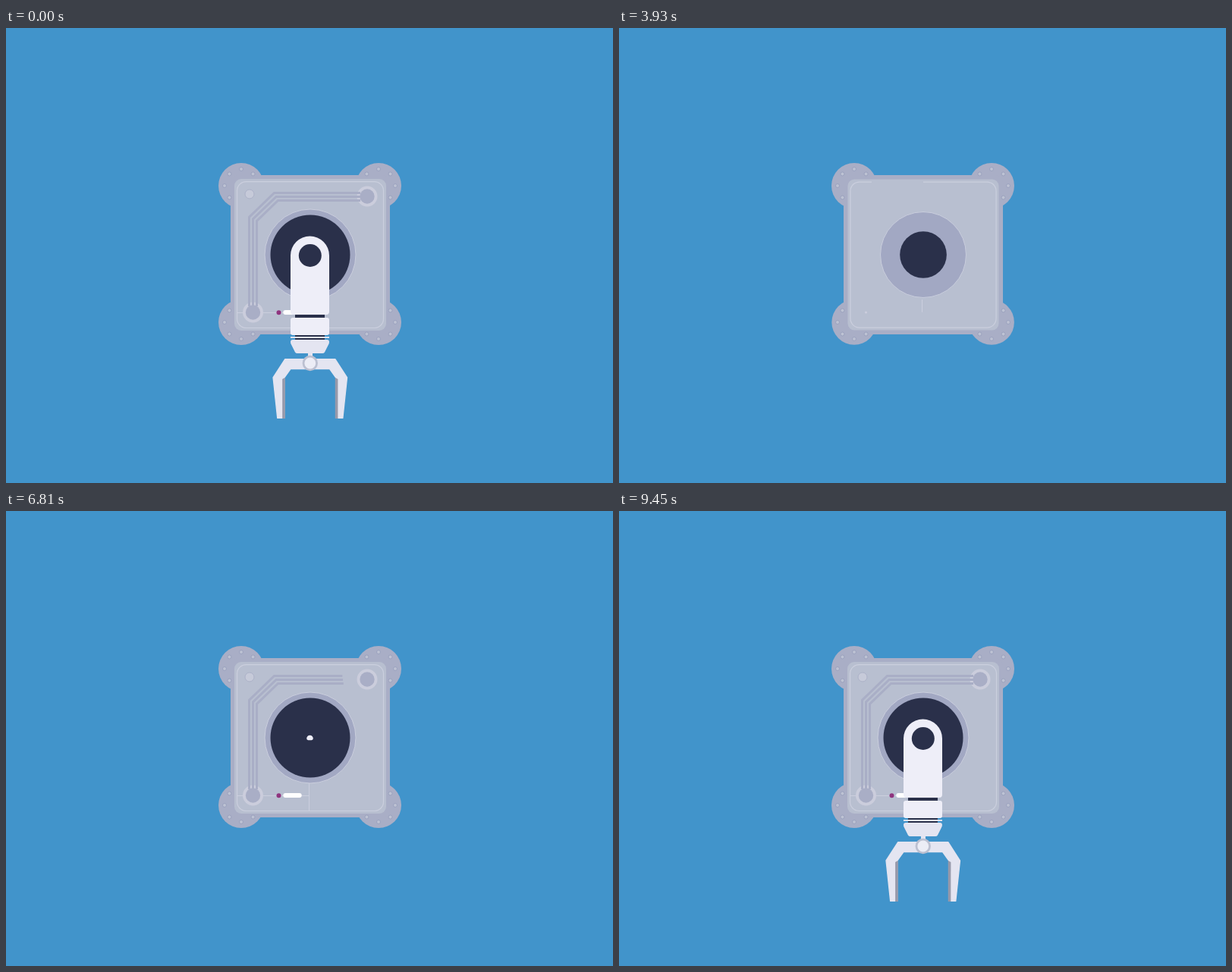
These frames come from a looping animation (800 by 600 pixels, 9.63 s). An HTML page:

```html
<!DOCTYPE html>
<html lang="en">
<head>
<meta charset="utf-8">
<title>Robot arm</title>
<style>
html, body { margin: 0; width: 100%; height: 100%; overflow: hidden; background: #4194cb; }
svg { display: block; width: 100%; height: 100%; }
</style>
</head>
<body>
<svg id="stage" viewBox="0 0 800 600">
  <g id="feet" fill="#a9aec6"></g>
  <rect id="base" x="296" y="194" width="210" height="210" rx="9" fill="#a9aec6"/>
  <g id="bolts" fill="#bdc2d3" stroke="#9ba2be" stroke-width="1"></g>
  <g id="panel">
    <rect x="301" y="199" width="200" height="200" rx="9" fill="#b8bfd0"/>
    <path id="outline" pathLength="1" fill="none" stroke="#cbcfde" stroke-width="1.2"
      d="M401 202.6H485.5a12 12 0 0 1 12 12V383.500a12 12 0 0 1 -12 12H316.500a12 12 0 0 1 -12 -12V214.600a12 12 0 0 1 12 -12Z"/>
  </g>
  <g fill="none" stroke="#cbcfde" stroke-width="1">
    <path id="wireV" pathLength="1" d="M399.500 358V395.500"/>
    <path id="wireH" pathLength="1" d="M399.500 375.500H305"/>
  </g>
  <circle id="screw" cx="321" cy="219" r="6" fill="#c6cad9" stroke="#acb2c8"/>
  <g fill="#cbcddc">
    <circle id="ringA" cx="325.500" cy="375" r="13.500"/>
    <circle id="ringB" cx="476" cy="222" r="13.500"/>
  </g>
  <g fill="#a9aec6">
    <circle id="discA" cx="325.500" cy="375" r="9.700"/>
    <circle id="discB" cx="476" cy="222" r="9.700"/>
  </g>
  <g id="traces" fill="none" stroke="#a9aec6" stroke-width="3">
    <path pathLength="1" d="M320.500 367V249.500L353.500 217.500H467"/>
    <path pathLength="1" d="M325.500 367V252L356 222.500H467"/>
    <path pathLength="1" d="M330.500 367V254.500L358.500 227.500H467"/>
  </g>
  <circle id="dot" cx="359.500" cy="375.300" r="3" fill="#8f347f"/>
  <rect id="pill" x="365.300" y="372" width="24.400" height="6" rx="3" fill="#fff"/>
  <circle id="collar" cx="401" cy="299" r="60" fill="#a2a8c3" stroke="#cbcfde"/>
  <circle id="well" cx="401" cy="299" r="52.500" fill="#2a304a"/>
  <g id="arm">
    <rect id="bar" x="381" y="377" width="39" height="6" fill="#2a304a"/>
    <g id="stripes">
      <rect x="381" y="404" width="39" height="8" fill="#2a304a"/>
      <rect x="375" y="407" width="51" height="2" fill="#dfe2ee"/>
    </g>
    <path id="boom" fill="#eeeef8"/>
    <circle id="hub" cx="400.800" cy="300" r="15" fill="#2a304a"/>
    <rect id="block" x="375" y="382" width="51" height="23" rx="3" fill="#eeeef8"/>
    <rect id="neck" x="398" y="428" width="6" height="6" fill="#e4e5f1"/>
    <path id="cup" fill="#e4e5f1"
      d="M378 411H423q3 0 3 3q0 2 -1 3.500L420 427.500q-1 1.500 -3 1.500H384q-2 0 -3 -1.500L376 417.500q-1 -1.500 -1 -3.500q0 -3 3 -3Z"/>
    <g id="claws" stroke-width="1.400" stroke-linejoin="round"></g>
    <circle id="joint" cx="400.800" cy="442" r="8.800" fill="#ecedf6" stroke="#bcc0d1" stroke-width="2.800"/>
  </g>
</svg>
<script>
const STEP = 30, COUNT = 321, MID = 160.5;
const NS = "http://www.w3.org/2000/svg";
const $ = id => document.getElementById(id);
const clamp = p => Math.min(1, Math.max(0, p));
const out = p => 1 - (1 - p) ** 3;
const inOut = p => p < .5 ? 4 * p ** 3 : 1 - 4 * (1 - p) ** 3;
const grow = (u, start, span) => out(clamp((u - start) / span));

function add(parent, tag, attrs) {
  const el = document.createElementNS(NS, tag);
  for (const k in attrs) el.setAttribute(k, attrs[k]);
  return parent.appendChild(el);
}

function scale(el, cx, cy, sx, sy = sx) {
  const on = sx > 0 && sy > 0;
  el.setAttribute("visibility", on ? "visible" : "hidden");
  if (on) el.setAttribute("transform", `translate(${cx} ${cy}) scale(${sx} ${sy}) translate(${-cx} ${-cy})`);
}

function draw(el, f) {
  el.setAttribute("visibility", f > 0 ? "visible" : "hidden");
  el.setAttribute("stroke-dasharray", f < 1 ? `${f} 2` : "none");
}

// Feet run clockwise from the top left; each shows five bolts on its outer side.
const feet = [], bolts = [];
[[310, 208], [491, 208], [491, 388], [310, 388]].forEach(([x, y], n) => {
  feet.push({ x, y, el: add($("feet"), "circle", { cx: x, cy: y, r: 30 }) });
  for (let k = -2; k <= 2; k++) {
    const a = (225 + 90 * n + 45 * k) * Math.PI / 180;
    const cx = x + 22 * Math.cos(a), cy = y + 22 * Math.sin(a);
    bolts.push({ x: cx, y: cy, el: add($("bolts"), "circle", { cx, cy, r: 2.5 }) });
  }
});

// Parts that pop up around their own centre: id, x, y, start, span.
const pops = [
  ["base", 401, 299, 0, 14.7], ["panel", 401, 299, 7, 27],
  ["collar", 401, 299, 13, 27], ["well", 401, 299, 22.6, 27],
  ["screw", 321, 219, 31, 12], ["ringA", 325.5, 375, 29, 12],
  ["discA", 325.5, 375, 31, 12], ["ringB", 476, 222, 31, 12],
  ["discB", 476, 222, 43, 13], ["dot", 359.5, 375.3, 45, 12],
  ["pill", 377.5, 375, 48, 12], ["hub", 400.8, 300, 76, 12],
  ["bar", 400.5, 380, 76, 9], ["block", 400.5, 382, 77, 9],
  ["stripes", 400.5, 408, 78, 9], ["cup", 400.5, 411, 79, 9],
  ["neck", 401, 428, 84, 8], ["joint", 400.8, 442, 89, 10]
].map(([id, ...rest]) => [$(id), ...rest]);

// Half claw as distance from the axis and height, stretched and folded.
const flat = [[0, 436.7], [32, 436.7], [60, 437.4], [95.3, 438.2], [95.3, 447.6], [40, 450.3], [32, 449.5], [0, 449.5]];
const bent = [[0, 436.7], [33, 436.7], [48.7, 461], [43, 514.4], [34, 514.4], [34, 461], [25.8, 449.5], [0, 449.5]];
const padFlat = [[40, 451], [96, 448.3], [96, 448.3], [40, 451]];
const padBent = [[33, 461], [33, 515], [36.6, 515], [36.6, 463]];
const sides = [-1, 1].map(dir => ({
  dir,
  limb: add($("claws"), "polygon", { fill: "#e4e5f1", stroke: "#e4e5f1" }),
  pad: add($("claws"), "polygon", { fill: "#9799aa" })
}));

const shape = (a, b, p, sx) => a.map(([x, y], n) =>
  `${400.8 + sx * (x + (b[n][0] - x) * p)},${y + (b[n][1] - y) * p}`).join(" ");

function drawBoom(u) {
  const wide = grow(u, 65.3, 20), tall = grow(u, 67.2, 20);
  const r = 25.5 * wide, end = 300 + 78 * tall, c = Math.min(4 + 8 * (1 - tall), r / 2);
  const x = 400.5, low = Math.max(end, 300 + c);
  $("boom").setAttribute("d", wide > 0
    ? `M${x - r} 300A${r} ${r} 0 0 1 ${x + r} 300V${low - c}Q${x + r} ${low} ${x + r - c} ${low}H${x - r + c}Q${x - r} ${low} ${x - r} ${low - c}Z`
    : "");
}

function drawClaws(u) {
  const reach = grow(u, 96, 10), fold = grow(u, 105.8, 10);
  $("claws").setAttribute("visibility", reach > 0 ? "visible" : "hidden");
  for (const s of sides) {
    s.limb.setAttribute("points", shape(flat, bent, fold, s.dir * reach));
    s.pad.setAttribute("points", shape(padFlat, padBent, fold, s.dir * reach));
  }
}

// The build runs from u = 0 to 160; the loop plays it backwards, then forwards.
function render(u) {
  for (const [el, x, y, start, span] of pops) scale(el, x, y, grow(u, start, span));
  feet.forEach((f, n) => scale(f.el, f.x, f.y, grow(u, 4 + 1.5 * n, 27)));
  bolts.forEach((b, n) => scale(b.el, b.x, b.y, grow(u, 11 + .35 * n, 10)));
  draw($("outline"), grow(u, 13, 30));
  draw($("wireV"), grow(u, 27, 14));
  draw($("wireH"), grow(u, 31, 12));
  for (const t of $("traces").children) draw(t, grow(u, 43, 42));
  drawBoom(u);
  drawClaws(u);
  const turn = 360 * inOut(clamp((155.5 - u) / 42.86));
  $("arm").setAttribute("transform", `rotate(${turn} 400.8 300)`);
}

const begin = performance.now();
function tick() {
  const i = Math.floor((performance.now() - begin) / STEP) % COUNT;
  render(Math.abs(i - MID));
  requestAnimationFrame(tick);
}
tick();
</script>
</body>
</html>
```
